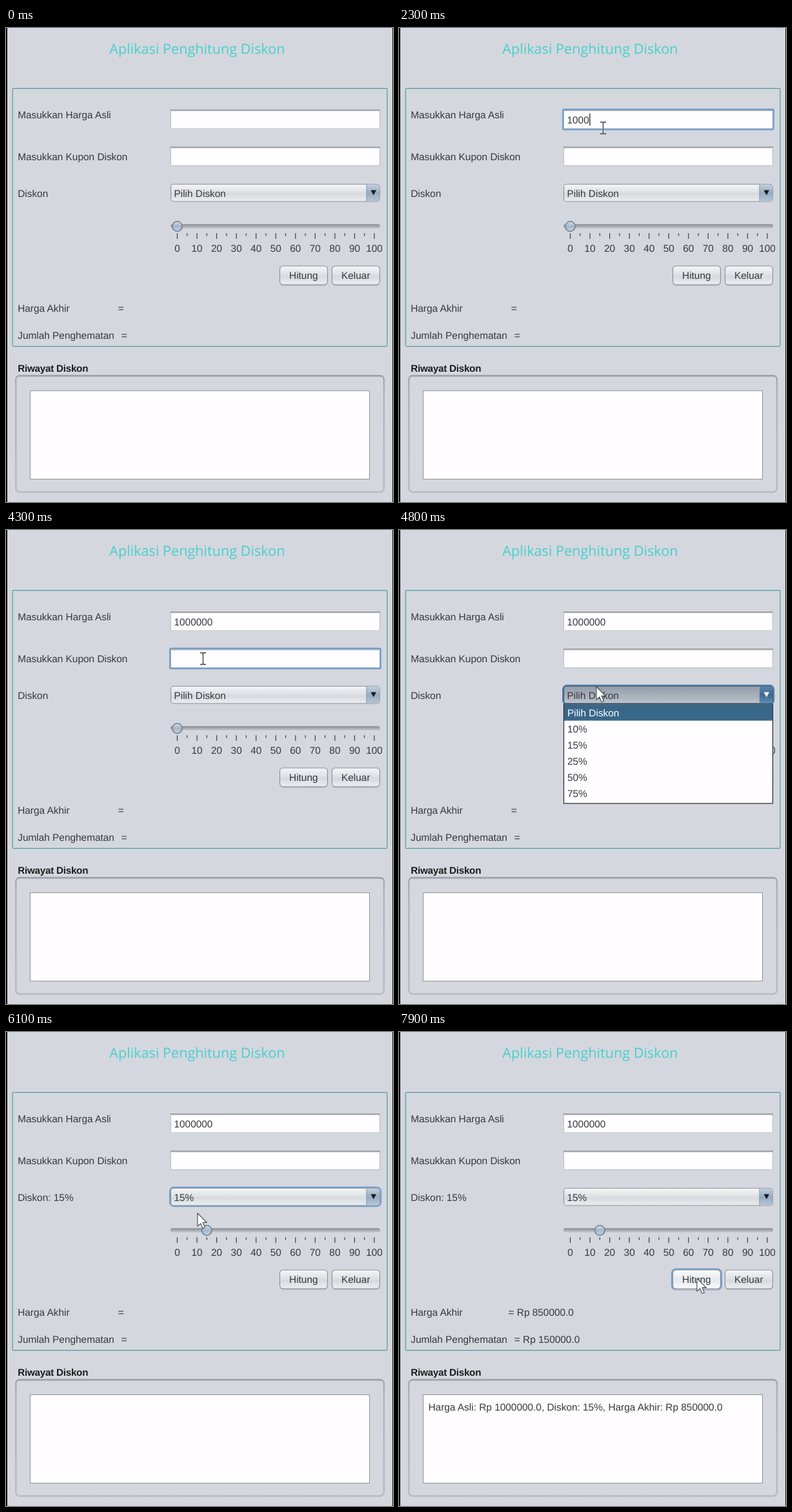
These frames come from a looping animation (600 by 735 pixels, 8 s). An HTML page:

```html
<!DOCTYPE html>
<html lang="id">
<head>
<meta charset="utf-8">
<title>Aplikasi Penghitung Diskon</title>
<style>
  html, body { margin: 0; width: 100%; height: 100%; overflow: hidden; background: #d4d7de; }
  svg { display: block; width: 600px; height: 735px; }
  text {
    font: 15.4px "Liberation Sans", Arial, sans-serif;
    fill: #37383b; white-space: pre; text-rendering: geometricPrecision;
  }
  .title { font: 21.65px "Open Sans", "Noto Sans", sans-serif; fill: #48cfcd; }
  .bold { font-size: 15.2px; font-weight: bold; letter-spacing: -.24px; fill: #1c1c1e; }
  .mid { text-anchor: middle; }
</style>
</head>
<body>
<svg id="stage" viewBox="0 0 600 735">
  <defs>
    <linearGradient id="face" x2="0" y2="1">
      <stop offset="0" stop-color="#f4f5f7"/><stop offset=".45" stop-color="#dfe2e6"/>
      <stop offset=".55" stop-color="#d6d9de"/><stop offset="1" stop-color="#eceef1"/>
    </linearGradient>
    <linearGradient id="faceHover" x2="0" y2="1">
      <stop offset="0" stop-color="#fdfdfe"/><stop offset=".5" stop-color="#e6e9ed"/>
      <stop offset="1" stop-color="#f8f9fa"/>
    </linearGradient>
    <linearGradient id="facePressed" x2="0" y2="1">
      <stop offset="0" stop-color="#939ca8"/><stop offset=".5" stop-color="#a6aeb9"/>
      <stop offset="1" stop-color="#bcc3cc"/>
    </linearGradient>
    <linearGradient id="arrowCell" x2="0" y2="1">
      <stop offset="0" stop-color="#c3d0dd"/><stop offset=".5" stop-color="#98acc0"/>
      <stop offset="1" stop-color="#b3c5d6"/>
    </linearGradient>
    <linearGradient id="arrowOpen" x2="0" y2="1">
      <stop offset="0" stop-color="#5c83a8"/><stop offset=".5" stop-color="#3d688f"/>
      <stop offset="1" stop-color="#5f8bb2"/>
    </linearGradient>
    <linearGradient id="track" x2="0" y2="1">
      <stop offset="0" stop-color="#85898f"/><stop offset=".45" stop-color="#a4a8af"/>
      <stop offset="1" stop-color="#c5c9cf"/>
    </linearGradient>
    <linearGradient id="knob" x2="0" y2="1">
      <stop offset="0" stop-color="#d3dde8"/><stop offset=".5" stop-color="#a3b6c9"/>
      <stop offset="1" stop-color="#cbd8e4"/>
    </linearGradient>
    <linearGradient id="frame" x2="0" y2="1">
      <stop offset="0" stop-color="#94979d"/><stop offset=".1" stop-color="#a7abb2"/>
      <stop offset="1" stop-color="#b4b8bf"/>
    </linearGradient>
    <clipPath id="scaleClip"><rect x="250" y="295" width="333" height="60"/></clipPath>
  </defs>
</svg>
<script>
const LOOP = 8000, TICK = 100;
const stage = document.getElementById('stage');

function add(tag, attrs, parent = stage) {
  const el = document.createElementNS('http://www.w3.org/2000/svg', tag);
  for (const key in attrs) el.setAttribute(key, attrs[key]);
  return parent.appendChild(el);
}
const group = (parent, attrs = {}) => add('g', attrs, parent);
const rect = (x, y, width, height, fill, more = {}, parent) =>
  add('rect', { x, y, width, height, fill, ...more }, parent);
const line = (d, stroke, width = 1, parent) =>
  add('path', { d, stroke, 'stroke-width': width, fill: 'none' }, parent);
function label(x, y, str, cls = '', parent) {
  const el = add('text', { x, y, class: cls }, parent);
  el.textContent = str;
  return el;
}
const show = (el, on) => el.setAttribute('visibility', on ? 'visible' : 'hidden');
const ring = (x, y, w, h, rx) =>
  rect(x, y, w, h, 'none', { rx, stroke: '#759fca', 'stroke-width': 2.4 });

function field(y) {
  rect(255, y, 325, 30, '#fffdff');
  rect(255, y + 1.3, 325, 1.5, '#d8d9dc');
  line(`M255.5 ${y}V${y + 29.5}H579.5V${y}`, '#b9bcc2');
  rect(255, y, 325, 1.5, '#8b8d92');
  return {
    ring: ring(254.3, y - .2, 326.4, 31, 1),
    text: label(260.5, y + 21.7, ''),
    caret: rect(0, y + 6, 1.2, 19, '#111')
  };
}

function button(x, str) {
  rect(x + 1, 371, 73, 29, '#b8bcc2', { rx: 5 });
  const face = rect(x + .5, 369, 74, 29, 'url(#face)', { rx: 5, stroke: '#8b8f95', 'stroke-width': 1.1 });
  label(x + 37.3, 389.2, str, 'mid');
  return face;
}

// Static form
rect(0, 0, 600, 735, '#d4d7de');
rect(0, 0, 2, 735, '#000');
rect(599, 0, 1, 735, '#222');
label(160.3, 40.3, 'Aplikasi Penghitung Diskon', 'title');
rect(10.2, 93.6, 580.8, 400, 'none', { rx: 1.5, stroke: '#519b9c', 'stroke-width': 1.2 });
label(18.2, 140.3, 'Masukkan Harga Asli');
label(18.2, 205.3, 'Masukkan Kupon Diskon');
const discountLabel = label(18.2, 261.6, '');
label(18.2, 439.5, 'Harga Akhir');
const finalPrice = label(174, 439.5, '');
label(18.2, 482, 'Jumlah Penghematan');
const saving = label(178.8, 482, '');

const price = field(126.5);
const coupon = field(184);

// Slider
rect(255, 304.2, 325, 6.6, 'url(#track)', { rx: 3 });
const scale = group(stage, { 'clip-path': 'url(#scaleClip)' });
const tickX = percent => 265.5 + percent * 3.055;
for (let p = 0; p <= 100; p += 5) {
  const major = p % 10 === 0;
  line(`M${tickX(p)} 318.3v${major ? 8.7 : 4.2}`, '#3d3e42', 1.2, scale);
  if (major) label(tickX(p), 347.2, p, 'mid', scale);
}
const knob = add('circle', { cy: 307.6, r: 7.7, fill: 'url(#knob)', stroke: '#626d79', 'stroke-width': 1.2 });

const calcRing = ring(423.2, 367.8, 76.6, 31.6, 6);
const calcFace = button(424, 'Hitung');
button(505, 'Keluar');

// History
label(18.3, 533, 'Riwayat Diskon', 'bold');
rect(15.5, 539.5, 570.5, 180, 'none', { rx: 6, stroke: '#c2c6cd', 'stroke-width': 3 });
rect(15.2, 538.8, 570.8, 180.6, 'none', { rx: 6, stroke: 'url(#frame)', 'stroke-width': 1.5 });
line('M19 540.2H583', '#a9acb2', 1.4);
rect(37.5, 562.5, 526, 137, '#fffdff', { stroke: '#90939a' });
const history = label(45.5, 587.3, '');

// Combo box
const comboRing = ring(254.2, 241, 326.8, 29, 6);
const comboFace = rect(255.5, 242.2, 324, 26.8, 'url(#face)', { rx: 4.5, stroke: '#8b8f95', 'stroke-width': 1.1 });
const comboCell = add('path', { d: 'M559 242.7H575.5Q579.5 242.7 579.5 246.7V264.5Q579.5 268.5 575.5 268.5H559Z' });
line('M559 242.7V268.5', '#8494a5');
const comboArrow = add('path', { d: 'M565.6 251.5H574L569.8 259.3Z' });
const comboText = label(260.5, 261.6, '');

const popup = group(stage);
rect(255.5, 270, 324, 154, '#fffdff', { stroke: '#23262b', 'stroke-width': 1.2 }, popup);
const bar = rect(256, 270.6, 323, 25, '#39678a', {}, popup);
const items = ['Pilih Diskon', '10%', '15%', '25%', '50%', '75%']
  .map((str, i) => label(261, 289.3 + i * 25, str, '', popup));

// Pointers
const arrow = group(stage);
add('path', {
  d: 'M0 0V20.2L4.7 15.8L8 23.6L11.4 22.2L8.1 14.4H14.3Z',
  fill: '#fff', stroke: '#44464c', 'stroke-width': 1.1, 'stroke-linejoin': 'round'
}, arrow);
const beam = group(stage);
const beamShape = 'M-4.5 -9H-1L0 -8L1 -9H4.5M0 -8V8M-4.5 9H-1L0 8L1 9H4.5';
line(beamShape, '#fff', 2.4, beam).setAttribute('opacity', .6);
line(beamShape, '#3a3b3f', 1.3, beam);

// Pointer path: time, x, y
const path = [
  [700, 560, 112], [1000, 390, 146], [1200, 316.5, 155], [3300, 316.5, 155],
  [3600, 305.5, 199.5], [4300, 305.5, 199.5], [4600, 306, 243], [4900, 306, 243],
  [5300, 309, 315], [5500, 308, 343], [5800, 308, 343], [6000, 298, 288],
  [6100, 297, 281], [6500, 297, 281], [7200, 458, 378], [7400, 462, 382], [LOOP, 462, 382]
];
const keys = [1700, 1900, 2000, 2200, 2500, 2600, 2800];
const at = { price: 1300, coupon: 3700, open: 4600, pick: 5800, press: 7500, result: 7600 };

function pointer(t) {
  const i = path.findIndex(p => p[0] > t);
  if (i < 1) return null;
  const [t0, x0, y0] = path[i - 1], [t1, x1, y1] = path[i];
  const k = (t - t0) / (t1 - t0), e = k * k * (3 - 2 * k);
  return [x0 + (x1 - x0) * e, y0 + (y1 - y0) * e];
}

function drawField(f, str, focused, blinkFrom, t) {
  f.text.textContent = str;
  show(f.ring, focused);
  show(f.caret, focused && Math.floor((t - blinkFrom) / 500) % 2 === 0);
  f.caret.setAttribute('x', 261 + str.length * 8.56);
}

function render(t) {
  const typed = keys.filter(k => k <= t);
  const open = t >= at.open && t < at.pick;
  const picked = t >= at.pick, done = t >= at.result;
  const pos = pointer(t);

  drawField(price, '1000000'.slice(0, typed.length), t >= at.price && t < at.coupon,
    typed.length ? typed[typed.length - 1] : at.price, t);
  drawField(coupon, '', t >= at.coupon && t < at.open, at.coupon, t);

  discountLabel.textContent = picked ? 'Diskon: 15%' : 'Diskon';
  comboText.textContent = picked ? '15%' : 'Pilih Diskon';
  show(comboRing, t >= at.open && t < at.press);
  comboRing.setAttribute('stroke', open ? '#5482ae' : '#759fca');
  comboFace.setAttribute('fill', open ? 'url(#facePressed)' : 'url(#face)');
  comboFace.setAttribute('stroke', open ? '#34516e' : '#8b8f95');
  comboCell.setAttribute('fill', open ? 'url(#arrowOpen)' : 'url(#arrowCell)');
  comboArrow.setAttribute('fill', open ? '#fff' : '#16191d');
  show(popup, open);
  if (open) {
    const row = Math.max(0, Math.min(5, Math.floor((pos[1] - 271) / 25)));
    bar.setAttribute('y', 270.6 + row * 25);
    items.forEach((el, i) => { el.style.fill = i === row ? '#fff' : ''; });
  }
  knob.setAttribute('cx', tickX(picked ? 15 : 0));

  const over = pos && pos[0] > 424 && pos[0] < 499 && pos[1] > 369 && pos[1] < 399;
  const pressed = t >= at.press && !done;
  calcFace.setAttribute('fill', `url(#face${pressed ? 'Pressed' : over ? 'Hover' : ''})`);
  show(calcRing, t >= at.press);

  finalPrice.setAttribute('x', done ? 169.5 : 173.7);
  finalPrice.textContent = done ? '= Rp 850000.0' : '=';
  saving.textContent = done ? '= Rp 150000.0' : '=';
  history.textContent = done ? 'Harga Asli: Rp 1000000.0, Diskon: 15%, Harga Akhir: Rp 850000.0' : '';

  const inField = y => (y > 126 && y < 157) || (y > 184 && y < 214);
  const isBeam = pos && pos[0] > 255 && pos[0] < 580 && inField(pos[1]);
  show(beam, isBeam);
  show(arrow, pos && !isBeam);
  if (pos) (isBeam ? beam : arrow).setAttribute('transform', `translate(${pos})`);
}

const start = performance.now();
function loop() {
  const t = (performance.now() - start) % LOOP;
  render(Math.floor(t / TICK) * TICK);
  requestAnimationFrame(loop);
}
loop();
</script>
</body>
</html>
```
